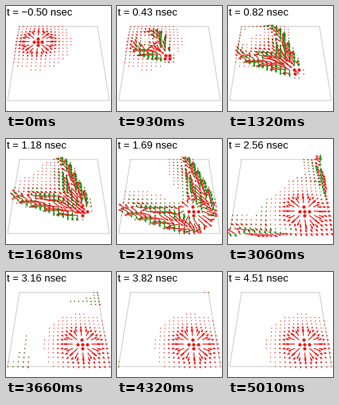
Animation of 132x132 px, one loop 5.04 s. Source, as a matplotlib script:

```python
import numpy as np
import matplotlib.pyplot as plt
from matplotlib.animation import FuncAnimation

SIZE, DPI = 132, 100
FRAMES, STEP = 168, 30
RED, GREEN = "#f01818", "#109010"

# wave speed (m/ns), pulse width (ns), charge radius (m), travel times (ns)
C, W, SOFT = 0.3, 0.12, 0.05
T0, T1 = -0.2, 1.2
START, END = 0.25, 0.75

# camera: horizon, screen growth per row, focal length and pitch
MID, HORIZON, GROWTH = 66, -278, 0.3226
FOCAL, SIN, COS = 237.3, 0.823, 0.568


def project(u, v, z=0.0):
    inv = 0.003292 - 0.000772 * v
    x = GROWTH * (u - 0.5) / inv
    y = HORIZON + 1 / inv - MID
    depth = FOCAL * inv / GROWTH
    d = depth - z * SIN
    return MID + x * depth / d, MID + (y * depth - FOCAL * COS * z) / d


def progress(t):
    return np.clip((t - T0) / (T1 - T0), 0, 1)


def place(t):
    p = progress(t)
    return START + (END - START) * p * p * (3 - 2 * p)


def speed(t):
    p = progress(t)
    return (END - START) * 6 * p * (1 - p) / (T1 - T0)


def pulse(s):
    """Smoothed step, impulse and impulse slope."""
    th = np.tanh(s / W)
    g = (1 - th * th) / (2 * W)
    return (1 + th) / 2, g, -2 * th * g / W


axis = np.linspace(0, 1, 21)
U, V = (a.ravel() for a in np.meshgrid(axis, axis))


def offsets(pos):
    du, dv = U[:, None] - pos, V[:, None] - pos
    r = np.sqrt(du * du + dv * dv + SOFT * SOFT)
    return du / r, dv / r, r


DT = 0.02
past = np.arange(T0 + DT / 2, T1, DT)
NU, NV, R = offsets(place(past))
VEL = speed(past)
NU0, NV0, R0 = (a[:, 0] for a in offsets(np.array([START])))
NU1, NV1, R1 = (a[:, 0] for a in offsets(np.array([END])))


def field(t):
    """In-plane electric field and vertical magnetic field of the moving charge."""
    _, g, dg = pulse(t - past - R / C)
    near = g / R**2 + dg / (C * R)
    drag = VEL * dg / (C * C * R)
    eu = (NU * near - drag).sum(1) * DT
    ev = (NV * near - drag).sum(1) * DT
    b = (VEL * (NU - NV) * near).sum(1) * DT / C

    G, g, _ = pulse(t - T0 - R0 / C)
    before = (1 - G) / R0**2 - g / (C * R0)
    G, g, _ = pulse(t - T1 - R1 / C)
    after = G / R1**2 + g / (C * R1)
    eu += NU0 * before + NU1 * after
    ev += NV0 * before + NV1 * after
    return eu, ev, b


def shrink(mag, cap):
    """Arrow length per unit of field, levelling off at cap."""
    return cap * np.tanh(0.0016 * mag / cap) / np.maximum(mag, 1e-9)


fig = plt.figure(figsize=(SIZE / DPI, SIZE / DPI), dpi=DPI, facecolor="white")
ax = fig.add_axes([0, 0, 1, 1])
ax.set(xlim=(0, SIZE), ylim=(SIZE, 0))
ax.axis("off")

edge = project(np.array([0, 1, 1, 0, 0]), np.array([0, 0, 1, 1, 0]))
ax.plot(*edge, color="#cccccc", lw=0.72)
label = ax.text(1, 12, "", family="Liberation Sans", size=13 * 72 / DPI,
                color="black", va="baseline")

X, Y = project(U, V)


def arrows(color, z):
    return ax.quiver(X, Y, np.ones_like(X), np.ones_like(X), color=color,
                     angles="xy", scale_units="xy", scale=1, units="dots",
                     width=1.15, headwidth=2.6, headlength=3, headaxislength=3,
                     minlength=1.2, zorder=z)


electric = arrows(RED, 3)
magnetic = arrows(GREEN, 4)
core = ax.scatter([], [], s=9, color=RED, lw=0, zorder=5)


def draw(i):
    t = -0.5 + 0.03 * i
    label.set_text(f"t = {t:.2f} nsec".replace("-", "\u2212"))
    eu, ev, b = field(t)
    mag = np.hypot(eu, ev)
    pos = place(t)
    close = np.hypot(U - pos, V - pos) < 0.056

    k = shrink(mag, 0.13)
    x, y = project(U + k * eu, V + k * ev)
    hide = (mag < 6) | close
    electric.set_UVC(np.ma.array(x - X, mask=hide), np.ma.array(y - Y, mask=hide))

    x, y = project(U, V, b * shrink(abs(b), 0.13))
    hide = (abs(b) < 6) | close
    magnetic.set_UVC(np.ma.array(x - X, mask=hide), np.ma.array(y - Y, mask=hide))

    core.set_offsets(np.c_[X[close], Y[close]])
    return electric, magnetic, core, label


anim = FuncAnimation(fig, draw, frames=FRAMES, interval=STEP,
                     repeat=True, repeat_delay=0, blit=False)
plt.show()
```
